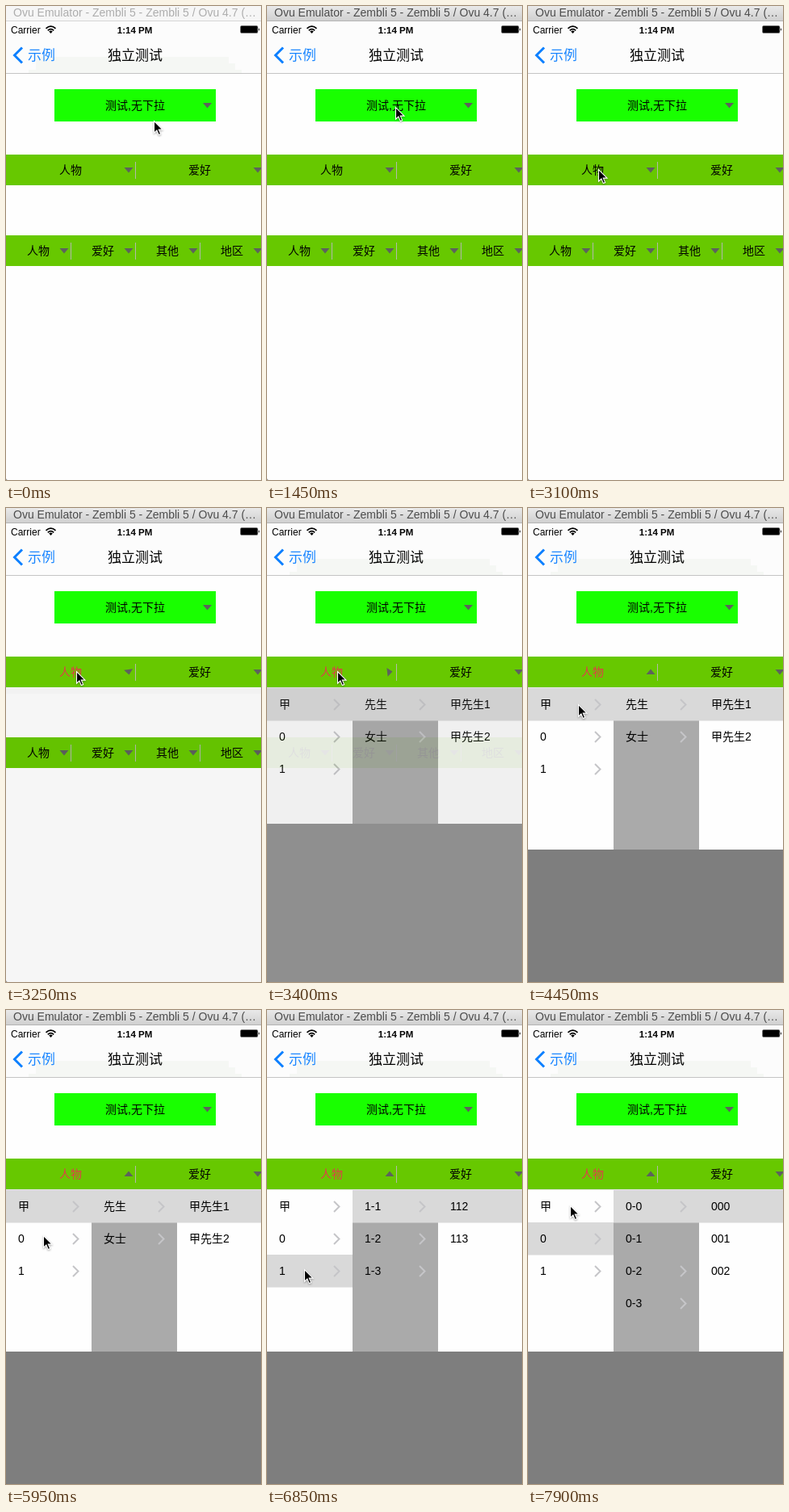
Recreate the animation shown at these times as an HTML page. Size 316 px wide and 587 px high, loop 8 s.

```html
<!DOCTYPE html>
<html lang="zh">
<head>
<meta charset="utf-8">
<style>
  html, body { margin: 0; width: 100%; height: 100%; overflow: hidden; background: #fefefe; }
  svg { display: block; }
  text { font: 14px "Liberation Sans", "Noto Sans CJK SC", "Noto Sans CJK", sans-serif; }
  .mid { text-anchor: middle; }
  .title { font-size: 17px; font-weight: 500; }
  .arrow { fill: #5d625d; }
  .chevron { fill: none; stroke: #c5c5c8; stroke-width: 2; }
</style>
</head>
<body>
<svg width="316" height="587" viewBox="0 0 316 587">
  <defs>
    <linearGradient id="chrome" x2="0" y2="1">
      <stop stop-color="#e9e9e9"/><stop offset="1" stop-color="#d0d0d0"/>
    </linearGradient>
    <clipPath id="reveal"><rect id="revealBox" y="222" width="316" height="0"/></clipPath>
  </defs>

  <rect width="316" height="587" fill="#fefefe"/>
  <rect y="19" width="316" height="64" fill="#fcfcfc"/>
  <path id="haze" d="M37 63H276V71H284V79H292V83H28V79H37Z" fill="#f5f7f4"/>
  <rect y="83" width="316" height="1" fill="#c4c4c4"/>

  <rect id="windowBar" width="316" height="18"/>
  <rect id="windowEdge" y="18" width="316" height="1"/>
  <text id="windowTitle" x="9" y="13">Ovu Emulator - Zembli 5 - Zembli 5 / Ovu 4.7 (…</text>

  <text x="6" y="34" style="font-size:12px">Carrier</text>
  <g fill="none" stroke="#000" stroke-width="1.8">
    <path d="M49.5 27.8Q55.5 22.4 61.5 27.8M51.8 30.3Q55.5 27 59.2 30.3"/>
    <path d="M53.2 31.4Q55.5 29.8 57.8 31.4L55.5 34Z" fill="#000" stroke="none"/>
  </g>
  <text class="mid" x="159.5" y="34" style="font-size:11.5px;font-weight:700">1:14 PM</text>
  <rect x="290.5" y="24.5" width="21.5" height="9" rx="1.5" fill="#000" stroke="#777" stroke-width=".6"/>
  <path d="M313 27.2Q315 29 313 30.8Z"/>

  <path d="M20 51.5L10.5 61L20 70.5" fill="none" stroke="#0e80ff" stroke-width="3"/>
  <text x="27" y="67.3" style="font-size:17px" fill="#1a86ff">示例</text>
  <text class="mid title" x="160" y="67.3">独立测试</text>

  <rect x="60" y="103" width="200" height="40" fill="#19ff00"/>
  <text class="mid" x="160" y="128.3" font-weight="500" style="font-weight:500">测试,无下拉</text>
  <path class="arrow" d="M244 120H255L249.5 126.5Z"/>

  <g id="lowerBar"></g>
  <rect id="shade" y="222" width="316" height="365" opacity="0"/>
  <g id="upperBar"></g>
  <g id="table" clip-path="url(#reveal)"></g>
  <path d="M0 585V587H2Q.4 587 0 585Z" fill="#777"/>

  <path id="cursor" d="M.5 .5V15.2L3.9 12L6.3 17.6L8.7 16.6L6.3 11.1H11Z"
        stroke="#fff" stroke-width="1.1" style="filter:drop-shadow(0 1px 1px #0005)"/>
</svg>

<script>
const LOOP = 8000;
const $ = id => document.getElementById(id);
const set = (id, attrs) => {
  for (const key in attrs) $(id).setAttribute(key, attrs[key]);
};

// Timelines hold each entry until the next one starts.
const pointer = [
  [0, 183, 142], [140, 173, 133], [290, 159, 125],
  [2500, 154, 131], [2650, 135, 153], [2800, 108, 184], [2950, 91, 200], [3100, 87, 202],
  [3700, 86, 205], [3850, 76, 222], [4000, 65, 238], [4150, 62, 242], [4450, 62, 243],
  [5350, 61, 244], [5650, 57, 257], [5800, 48, 275], [5950, 46, 279],
  [6400, 46, 300], [6550, 46, 321], [7000, 46, 300], [7150, 45, 276],
  [7750, 49, 259], [7900, 52, 242]
];
// time, shade opacity, table height, table opacity, arrow angle
const opening = [
  [0, 0, 0, 0, 0], [3250, .03, 8, .1, -8],
  [3400, .44, 169, .88, -97], [3550, .5, 201, 1, -180]
];
const choices = [[0, 0], [6100, 1], [6850, 2], [7450, 1]];
const at = (track, time) => track.findLast(step => step[0] <= time);

const people = ["甲", "0", "1"];
const details = [
  [["先生", "女士"], ["甲先生1", "甲先生2"]],
  [["0-0", "0-1", "0-2", "0-3"], ["000", "001", "002"]],
  [["1-1", "1-2", "1-3"], ["112", "113"]]
];
const leaf = "0-1";

function bar(y, labels, width) {
  return `<rect y="${y}" width="316" height="38" fill="#67c800"/>` + labels.map((label, i) => {
    const right = (i + 1) * width;
    return `<text class="mid" x="${right - width / 2}" y="${y + 24}">${label}</text>
      <path class="arrow" d="M-5.5 -3H5.5L0 3.5Z" transform="translate(${right - 8} ${y + 19})"/>
      <rect x="${right}" y="${y + 9}" width="1" height="21" fill="#b3b9ab"/>`;
  }).join("");
}

function column(x, width, fill, rows, selected, hasChevrons) {
  const cells = rows.map((label, i) => {
    const y = 243 + i * 40, end = x + width - 23;
    const chevron = hasChevrons && label !== leaf
      ? `<path class="chevron" d="M${end} ${y - 6}l6.5 6.5l-6.5 6.5"/>` : "";
    return `<text x="${x + 15}" y="${y + 5}">${label}</text>${chevron}`;
  });
  return `<rect x="${x}" y="222" width="${width}" height="201" fill="${fill}"/>
    <rect x="${x}" y="${223 + selected * 40}" width="${width}" height="40.5" fill="#d9d9d9"/>` + cells.join("");
}

function table(choice) {
  const [middle, last] = details[choice];
  return column(0, 106, "#fefefe", people, choice, true) +
    column(106, 106, "#aaa", middle, 0, true) +
    column(212, 104, "#fefefe", last, 0, false) +
    '<rect y="222" width="316" height="1" fill="#e6e6e6"/>';
}

$("upperBar").innerHTML = bar(184, ["人物", "爱好"], 160);
$("lowerBar").innerHTML = bar(284, ["人物", "爱好", "其他", "地区"], 80);
const openLabel = $("upperBar").querySelector("text");
const openArrow = $("upperBar").querySelector(".arrow");
let shownChoice = -1;

function draw(time) {
  const [, x, y] = at(pointer, time);
  const [, shade, height, opacity, angle] = at(opening, time);
  const [, choice] = at(choices, time);
  const active = time >= 1450;

  if (choice !== shownChoice) {
    $("table").innerHTML = table(choice);
    shownChoice = choice;
  }
  set("windowBar", { fill: active ? "url(#chrome)" : "#f6f6f6" });
  set("windowEdge", { fill: active ? "#b4b4b4" : "#d6d6d6" });
  set("windowTitle", { fill: active ? "#4c4c4c" : "#adadad" });
  set("haze", { opacity: active && time < 3400 ? 0 : 1 });
  set("shade", { opacity: shade });
  set("revealBox", { height });
  set("table", { opacity });
  set("cursor", { transform: `translate(${x} ${y})` });
  openLabel.setAttribute("fill", time >= 3250 ? "#e23c48" : "#000");
  openArrow.setAttribute("transform", `translate(152 203) rotate(${angle})`);
}

const start = performance.now();
function tick() {
  draw((performance.now() - start) % LOOP);
  requestAnimationFrame(tick);
}
tick();
</script>
</body>
</html>
```
